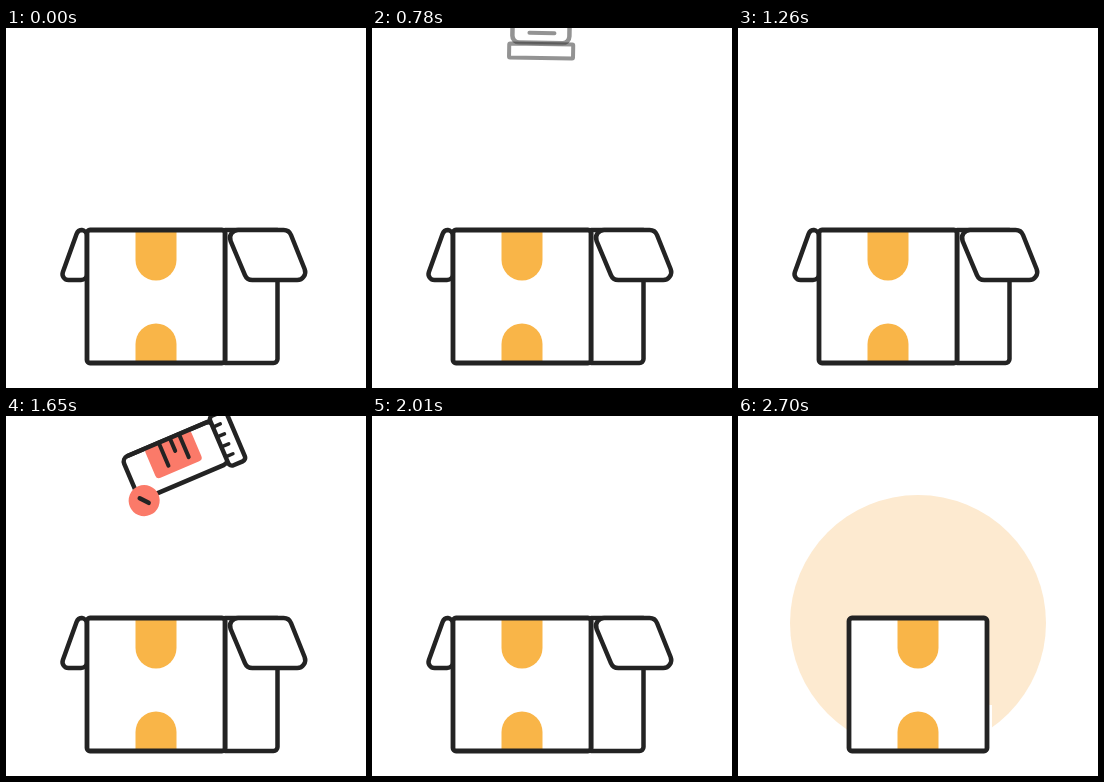
These frames come from a looping animation (360 px wide and 360 px high, 3630 ms). An HTML page with a canvas:

```html
<!DOCTYPE html>
<html lang="en">
<head>
<meta charset="utf-8">
<title>Packing a box</title>
<style>
  html, body { margin: 0; width: 100%; height: 100%; overflow: hidden; background: #fff; }
  canvas { display: block; width: 360px; height: 360px; }
</style>
</head>
<body>
<canvas id="stage"></canvas>
<script>
const LOOP = 3630, STEP = 30;
const INK = '#232323', AMBER = '#f9b548', PEACH = '#fdead0';
const PINK = '#f5a4c6', CORAL = '#fb7a69', BLUE = '#8fcdec';

const canvas = document.getElementById('stage');
const ctx = canvas.getContext('2d');
const dpr = window.devicePixelRatio || 1;
canvas.width = canvas.height = Math.round(360 * dpr);

const rad = deg => deg * Math.PI / 180;
const mix = (a, b, k) => a + (b - a) * k;
const clamp = v => Math.max(0, Math.min(1, v));

function paint(fill, stroke, width = 4.5) {
  if (fill) { ctx.fillStyle = fill; ctx.fill(); }
  if (stroke) { ctx.strokeStyle = stroke; ctx.lineWidth = width; ctx.stroke(); }
}

function line(x1, y1, x2, y2, width = 4) {
  ctx.beginPath();
  ctx.moveTo(x1, y1);
  ctx.lineTo(x2, y2);
  paint(null, INK, width);
}

function box(x, y, w, h, r, fill, stroke, width) {
  ctx.beginPath();
  ctx.roundRect(x, y, w, h, r);
  paint(fill, stroke, width);
}

function disc(x, y, r, fill, stroke, width) {
  ctx.beginPath();
  ctx.arc(x, y, r, 0, 7);
  paint(fill, stroke, width);
}

// Closed polygon with rounded corners
function poly(pts, r, fill, stroke) {
  const n = pts.length, [a, b] = [pts[n - 1], pts[0]];
  ctx.beginPath();
  ctx.moveTo((a[0] + b[0]) / 2, (a[1] + b[1]) / 2);
  pts.forEach((p, i) => ctx.arcTo(...p, ...pts[(i + 1) % n], r));
  ctx.closePath();
  paint(fill, stroke);
}

function at(x, y, deg, draw) {
  ctx.save();
  ctx.translate(x, y);
  ctx.rotate(rad(deg));
  draw();
  ctx.restore();
}

function cap(half, ticks) {
  box(-half, -9, half * 2, 18, 4, '#fff', INK);
  for (let i = 1; i <= ticks; i++) {
    const x = mix(-half, half, i / (ticks + 1));
    line(x, 7, x, 1, 3.5);
  }
}

function capsule(x, y, deg, fill) {
  at(x, y, deg, () => {
    box(-16, -7.5, 32, 15, 7.5, fill, INK, 4);
    line(0, -7, 0, 7);
  });
}

// Each item has its origin at the middle of the cap, with the body below it
function pillBottle() {
  poly([[-27, 8], [-27, 22], [-49, 35], [-49, 117], [44, 117], [44, 35], [26, 22], [26, 8]], 7, '#fff', INK);
  box(-39, 41, 68, 67, 5, PINK);
  capsule(-16, 63, -42, PINK);
  disc(8, 79, 12, PINK, INK, 4);
  line(3, 84, 13, 74);
  capsule(-7, 88, -48, PINK);
  cap(30, 4);
}

function jar() {
  box(-28, 8, 57, 97, 7, '#fff', INK);
  line(-13, 18, 12, 18);
  box(-27, 36, 55, 46, 3, BLUE);
  line(0, 50, 0, 68);
  line(-9, 59, 9, 59);
  box(-32, -7, 64, 14, 1, '#fff', INK, 4);
}

function tube() {
  box(-23, 8, 46, 97, 6, '#fff', INK);
  box(-23, 31, 33, 50, 4, CORAL);
  line(-23, 8, -23, 99, 4.5);
  line(-23, 65, 2, 65);
  line(-23, 53, -9, 53);
  line(-23, 43, 2, 43);
  cap(27, 4);
  disc(24.6, 101, 15.5, CORAL);
  at(24.6, 101, -40, () => line(-5, 0, 5, 0, 4.5));
}

const drops = [[30, pillBottle], [780, jar], [1530, tube]];

function fall(ms, item) {
  const u = ms / 120;
  const y = -27 + 42.5 * u + 26.5 * u * u;
  const x = 170 + 5.5 * clamp(u);
  ctx.save();
  ctx.beginPath();
  ctx.rect(0, 0, 360, 204);
  ctx.clip();
  ctx.globalAlpha = clamp(0.49 + ms / 120);
  at(x, y, 181 * Math.pow(0.37, u), () => {
    ctx.translate(0, -50);
    item();
  });
  ctx.restore();
}

function tabs(x) {
  box(x - 20.5, 202, 41, 50.5, [0, 0, 20.5, 20.5], AMBER);
  box(x - 20.5, 295.5, 41, 39, [20.5, 20.5, 0, 0], AMBER);
}

// k = 0 is the open carton, k = 1 the closed front view
function carton(k) {
  const left = mix(81, 111, k), right = left + 138;
  const wall = mix(271.5, 249, k), low = mix(252, 202, k);
  if (k < 1) {
    poly([[left, 202], [mix(72, left, k), 202], [mix(54, left, k), low], [left, low]], 6 * (1 - k), '#fff', INK);
    box(right, 202, wall - right, 133, [0, 0, 4, 0], '#fff', INK);
    poly([[right + 1, 202], [mix(283, right + 2, k), 202], [mix(303, right + 2, k), low],
      [mix(241, right + 1, k), low]], 8 * (1 - k), '#fff', INK);
  }
  box(left, 202, 138, 133, 3, '#fff');
  tabs(left + 69);
  box(left, 202, 138, 133, 3, null, INK, 4.8);
}

function draw(t) {
  ctx.setTransform(dpr, 0, 0, dpr, 0, 0);
  ctx.lineCap = ctx.lineJoin = 'round';
  ctx.fillStyle = '#fff';
  ctx.fillRect(0, 0, 360, 360);

  let dip = 0;
  for (const [start, item] of drops) {
    const ms = t - start;
    if (ms < 0 || ms >= 480) continue;
    if (ms < 360) fall(ms, item);
    if (ms > 300) dip = 4.5 * Math.sin(Math.PI * (ms - 300) / 180);
  }

  const p = clamp((t - 2400) / 300);
  const k = p * p * (3 - 2 * p);
  if (k > 0) disc(180, 207, 128 * k, PEACH);
  if (k === 1) {
    ctx.fillStyle = '#fff';
    ctx.fillRect(250, 289, 4, 26);
  }
  ctx.translate(0, dip);
  carton(k);
}

const begin = performance.now();
function tick() {
  const t = (performance.now() - begin) % LOOP;
  draw(Math.floor(t / STEP) * STEP);
  requestAnimationFrame(tick);
}
tick();
</script>
</body>
</html>
```
